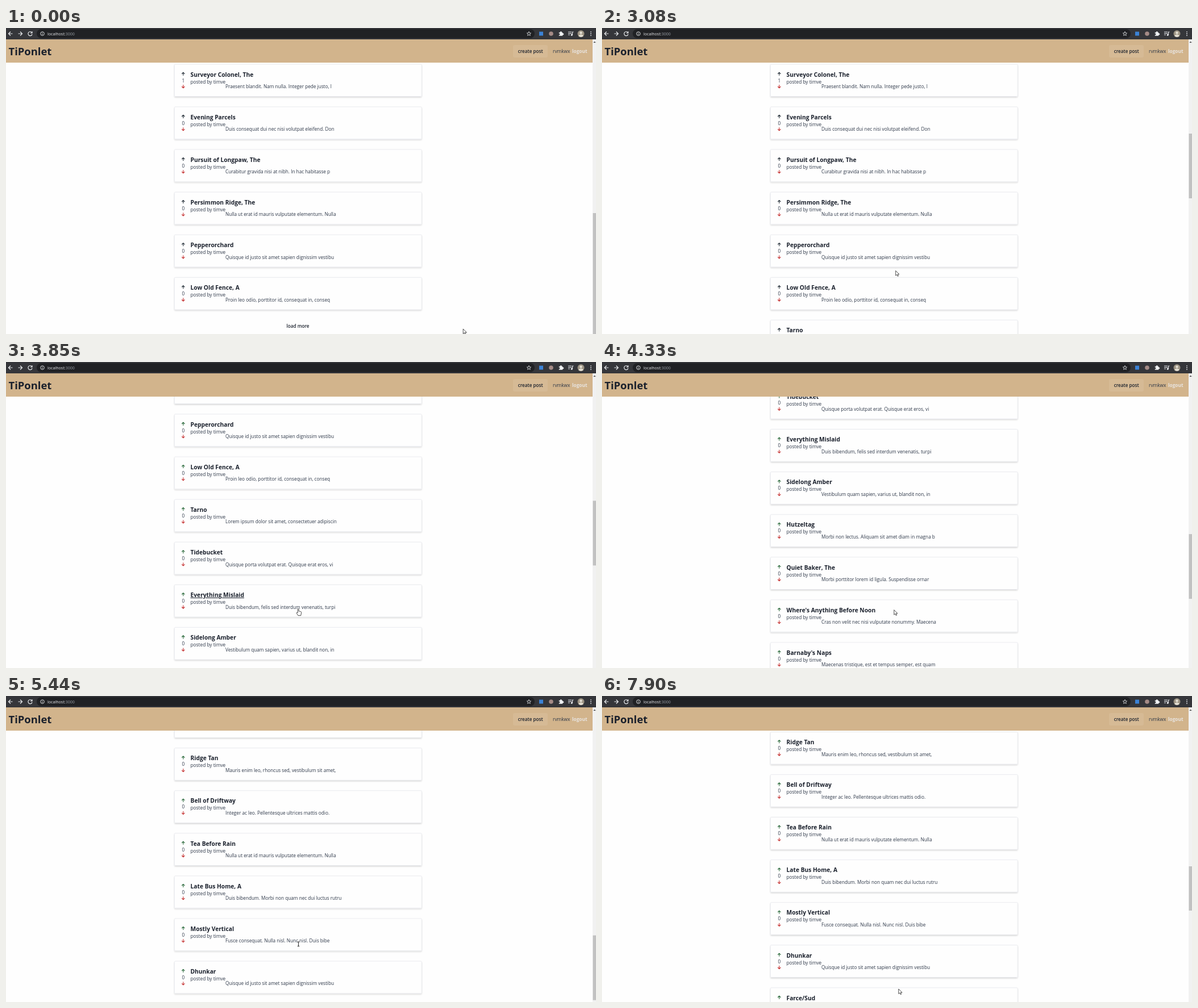
An HTML page that plays this animation: 1038x539 px, repeating every 7990 ms.

```html
<!DOCTYPE html>
<html lang="en">
<head>
<meta charset="utf-8">
<style>
  html, body { margin: 0; width: 100%; height: 100%; overflow: hidden; background: #fefefe; }
  svg { display: block; width: 1038px; height: 539px; }
  text { font: 8.3px "Open Sans", "Noto Sans", sans-serif; fill: #2d3748; white-space: pre; }
  .title { font-size: 10.25px; font-weight: 700; fill: #1a202c; }
  .body { font-size: 8.23px; }
  .button { font-size: 8.15px; font-weight: 600; fill: #1a202c; }
  .card { fill: #fefefe; stroke: #e6e8ec; stroke-width: .8; }
  .line { fill: none; stroke-width: 1.1; }
  .up { stroke: var(--up); }
  .chrome { fill: none; stroke: #e8eaed; stroke-width: 1.2; }
  .pointer { fill: #fff; stroke: #222; stroke-width: .8; stroke-linejoin: round; }
</style>
</head>
<body>
<svg id="stage" viewBox="0 0 1038 539">
  <defs>
    <filter id="shadow" x="-3%" y="-15%" width="106%" height="145%">
      <feDropShadow dx="0" dy="1.5" stdDeviation="1.1" flood-color="#000" flood-opacity=".16"/>
    </filter>
  </defs>
  <rect width="1038" height="539" fill="#fefefe"/>

  <g id="page">
    <g id="cards"></g>
    <g id="loadMore">
      <rect id="loadBox" x="484.5" y="-.6" width="58.5" height="22.5" rx="3"/>
      <text class="button" x="513.5" y="14.2" text-anchor="middle">load more</text>
    </g>
  </g>

  <rect y="20" width="1032" height="41" fill="#d2b48c"/>
  <text x="4.5" y="48" style="font-size:18.4px;font-weight:700;fill:#1a202c">TiPonlet</text>
  <rect x="892" y="30" width="61" height="22" rx="3" fill="#d6ba95"/>
  <text class="button" x="922.7" y="44" text-anchor="middle">create post</text>
  <text x="962" y="44">rvmkwx</text>
  <text x="996" y="44" style="font-weight:700;fill:#e8e4e0">logout</text>

  <rect x="1032" y="20" width="6" height="519" fill="#f1f1f1"/>
  <path d="M1033.4 26L1035.5 23.5L1037.6 26Z" fill="#505050"/>
  <rect id="thumb" x="1032.5" width="5.5" fill="#c1c1c1"/>

  <rect width="1038" height="20" fill="#35363a"/>
  <rect x="54" y="2" width="876" height="16" rx="8" fill="#202124"/>
  <g class="chrome">
    <path d="M11.5 10H4.5M8 6.5L4.5 10L8 13.5M21.5 10H28.5M25 6.5L28.5 10L25 13.5"/>
    <path d="M45.2 7.7A3.6 3.6 0 1 0 46 11M46 6V8.8H43.2"/>
    <circle cx="64" cy="10" r="3.3" stroke-width=".9"/>
    <path d="M64 9.5V12M64 7.7V8.6" stroke-width=".9"/>
    <path d="M920 6.3L921 8.8L923.6 9L921.6 10.7L922.3 13.3L920 11.9L917.7 13.3L918.4 10.7L916.4 9L919 8.8Z" stroke-width=".8"/>
    <path d="M989 7H995M989 9.5H995M989 12H992M996.5 12V7H998.5"/>
    <circle cx="995.3" cy="12.2" r="1" fill="#e8eaed"/>
  </g>
  <text x="73" y="12.6" style="font-size:7.1px;fill:#e8eaed">localhost:<tspan fill="#9aa0a6">3000</tspan></text>
  <rect x="938" y="6.5" width="7" height="7" fill="#3b82d6"/>
  <circle cx="959" cy="10" r="3.8" fill="#a58b86"/>
  <path d="M972.8 7.8H975A1.4 1.4 0 1 1 977.6 7.8H979.3V9.5A1.4 1.4 0 1 1 979.3 12V13.8H972.8V12A1.2 1.2 0 1 0 972.8 9.8Z" fill="#f1f3f4"/>
  <circle cx="1011.5" cy="10" r="6" fill="#9d9484"/>
  <path d="M1007.3 14.2A4.3 3.5 0 0 1 1015.7 14.2A6 6 0 0 1 1007.3 14.2Z" fill="#e3ded2"/>
  <circle cx="1011.5" cy="8.5" r="2.3" fill="#e3ded2"/>
  <g fill="#e8eaed"><circle cx="1029" cy="6.8" r=".9"/><circle cx="1029" cy="10" r=".9"/><circle cx="1029" cy="13.2" r=".9"/></g>

  <g id="cursor">
    <path id="arrow" class="pointer" d="M0 0V8.6L2 6.8L3.4 9.8L4.8 9.2L3.5 6.3H6.2Z"/>
    <path id="hand" class="pointer" d="M-.9 7.5V1Q0 -.4 .9 1V4.6L2.2 4.8L3.6 5.1L5 5.6Q5.5 6 5.4 7.5L4.5 12.3H-.3L-3 8.1Q-3.2 6.8 -2 6.7Z"/>
    <path id="beam" class="line" stroke="#333" d="M-1 -4Q.2 -4 .7 -3.3Q1.2 -4 2.4 -4M.7 -3.3V3.3M-1 4Q.2 4 .7 3.3Q1.2 4 2.4 4"/>
  </g>
</svg>
<script>
const LOOP = 7990, PITCH = 75.1, FIRST_TOP = 63.5;
const FIRST_LOAD = 2750, SECOND_LOAD = 7770;
const $ = id => document.getElementById(id);

const posts = `Surveyor Colonel, The|Praesent blandit. Nam nulla. Integer pede justo, l
Evening Parcels|Duis consequat dui nec nisi volutpat eleifend. Don
Pursuit of Longpaw, The|Curabitur gravida nisi at nibh. In hac habitasse p
Persimmon Ridge, The|Nulla ut erat id mauris vulputate elementum. Nulla
Pepperorchard|Quisque id justo sit amet sapien dignissim vestibu
Low Old Fence, A|Proin leo odio, porttitor id, consequat in, conseq
Tarno|Lorem ipsum dolor sit amet, consectetuer adipiscin
Tidebucket|Quisque porta volutpat erat. Quisque erat eros, vi
Everything Mislaid|Duis bibendum, felis sed interdum venenatis, turpi
Sidelong Amber|Vestibulum quam sapien, varius ut, blandit non, in
Hutzeltag|Morbi non lectus. Aliquam sit amet diam in magna b
Quiet Baker, The|Morbi porttitor lorem id ligula. Suspendisse ornar
Where's Anything Before Noon|Cras non velit nec nisi vulputate nonummy. Maecena
Barnaby's Naps|Maecenas tristique, est et tempus semper, est quam
Inheritance, The (Skabet)|Nullam porttitor lacus at turpis. Donec posuere me
Ridge Tan|Mauris enim leo, rhoncus sed, vestibulum sit amet,
Bell of Driftway|Integer ac leo. Pellentesque ultrices mattis odio.
Tea Before Rain|Nulla ut erat id mauris vulputate elementum. Nulla
Late Bus Home, A|Duis bibendum. Morbi non quam nec dui luctus rutru
Mostly Vertical|Fusce consequat. Nulla nisl. Nunc nisl. Duis bibe
Dhunkar|Quisque id justo sit amet sapien dignissim vestibu
Farce/Sud|`.split("\n").map(row => row.split("|"));
const upvoted = [0, 14], hoveredPost = 8;

$("cards").innerHTML = posts.map(([title, body], i) => `
  <g transform="translate(0 ${FIRST_TOP + i * PITCH})">
    <rect class="card" x="296.4" y=".3" width="434.8" height="56.7" rx="1.5" filter="url(#shadow)"/>
    <path class="line up" d="M311.8 20.3V14.8M309.2 17.4L311.8 14.8L314.4 17.4"/>
    <text x="311.8" y="32" text-anchor="middle">${upvoted.includes(i) ? 1 : 0}</text>
    <path class="line" stroke="#c53030" d="M311.8 36.6V42.1M309.2 39.5L311.8 42.1L314.4 39.5"/>
    <text class="title" x="324.5" y="22">${title}</text>
    <text x="324.5" y="34">posted by timve</text>
    <text class="body" x="386" y="42.7">${body}</text>
  </g>`).join("");
const cards = [...$("cards").children];
const hoveredTitle = cards[hoveredPost].querySelector(".title");

// Keyframes are [time, ...values]
const scrollKeys = [[3220, 0], [3850, 272.3], [3920, 272.3], [4330, 545], [4630, 871],
  [4760, 930], [5050, 1090], [5380, 1090], [5440, 1098.5], [5590, 1127]];
const cursorKeys = [[0, 804.8, 530], [320, 620, 529], [570, 519, 525], [1120, 519, 525],
  [1190, 517, 518.5], [1330, 523.5, 520], [1860, 523.5, 520], [2300, 550, 440],
  [2680, 577, 379], [3080, 516.7, 427.5], [3220, 516.7, 427.5], [3500, 514, 434.3],
  [3850, 514.2, 434.3], [3990, 513.8, 436.6], [5780, 513.8, 436.8], [6060, 511, 527],
  [6270, 511, 527], [6410, 511, 519.5], [7700, 511, 519.5], [7900, 521.8, 516]];
const cursorKinds = [[0, "arrow"], [1190, "hand"], [1930, "arrow"], [3850, "hand"],
  [3990, "arrow"], [5240, "beam"], [5920, "arrow"], [6340, "hand"], [7770, "arrow"]];

function tween(keys, t) {
  const next = keys.findIndex(key => key[0] > t);
  if (next === 0) return keys[0].slice(1);
  if (next < 0) return keys[keys.length - 1].slice(1);
  const a = keys[next - 1], b = keys[next];
  const k = (t - a[0]) / (b[0] - a[0]);
  return a.slice(1).map((v, i) => v + (b[i + 1] - v) * k);
}

function set(el, attrs) {
  for (const name in attrs) el.setAttribute(name, attrs[name]);
}

function show(el, visible) {
  el.style.display = visible ? "" : "none";
}

function drawLoadButton(t) {
  const fill = t < 1330 || t >= FIRST_LOAD ? "none" : t >= 1600 && t < 1720 ? "#cbd5e0" : "#e2e8f0";
  const focused = t >= 1600 && t < FIRST_LOAD;
  set($("loadBox"), { fill, stroke: focused ? "#a3cbef" : "none", "stroke-width": 1.4 });
}

function draw(t) {
  const [scroll] = tween(scrollKeys, t);
  const [x, y] = tween(cursorKeys, t);
  const count = t < FIRST_LOAD ? 6 : t < SECOND_LOAD ? 21 : 36;

  set($("page"), { transform: `translate(0 ${-scroll})` });
  cards.forEach((card, i) => show(card, i < count));
  $("cards").style.setProperty("--up", t < 3290 ? "#1f2a33" : "#276738");
  set($("loadMore"), { transform: `translate(0 ${FIRST_TOP + count * PITCH})` });
  drawLoadButton(t);
  hoveredTitle.style.textDecoration = t >= 3850 && t < 3990 ? "underline" : "none";

  const [thumbY, thumbHeight] = count === 6 ? [326, 213]
    : count === 21 ? [186 + scroll * .2145, 114] : [300, 78];
  set($("thumb"), { y: thumbY, height: thumbHeight });

  const kind = cursorKinds.filter(([start]) => start <= t).pop()[1];
  for (const name of ["arrow", "hand", "beam"]) show($(name), name === kind);
  set($("cursor"), { transform: `translate(${x} ${y})` });
}

const start = performance.now();
function tick() {
  draw((performance.now() - start) % LOOP);
  requestAnimationFrame(tick);
}
tick();
</script>
</body>
</html>
```
